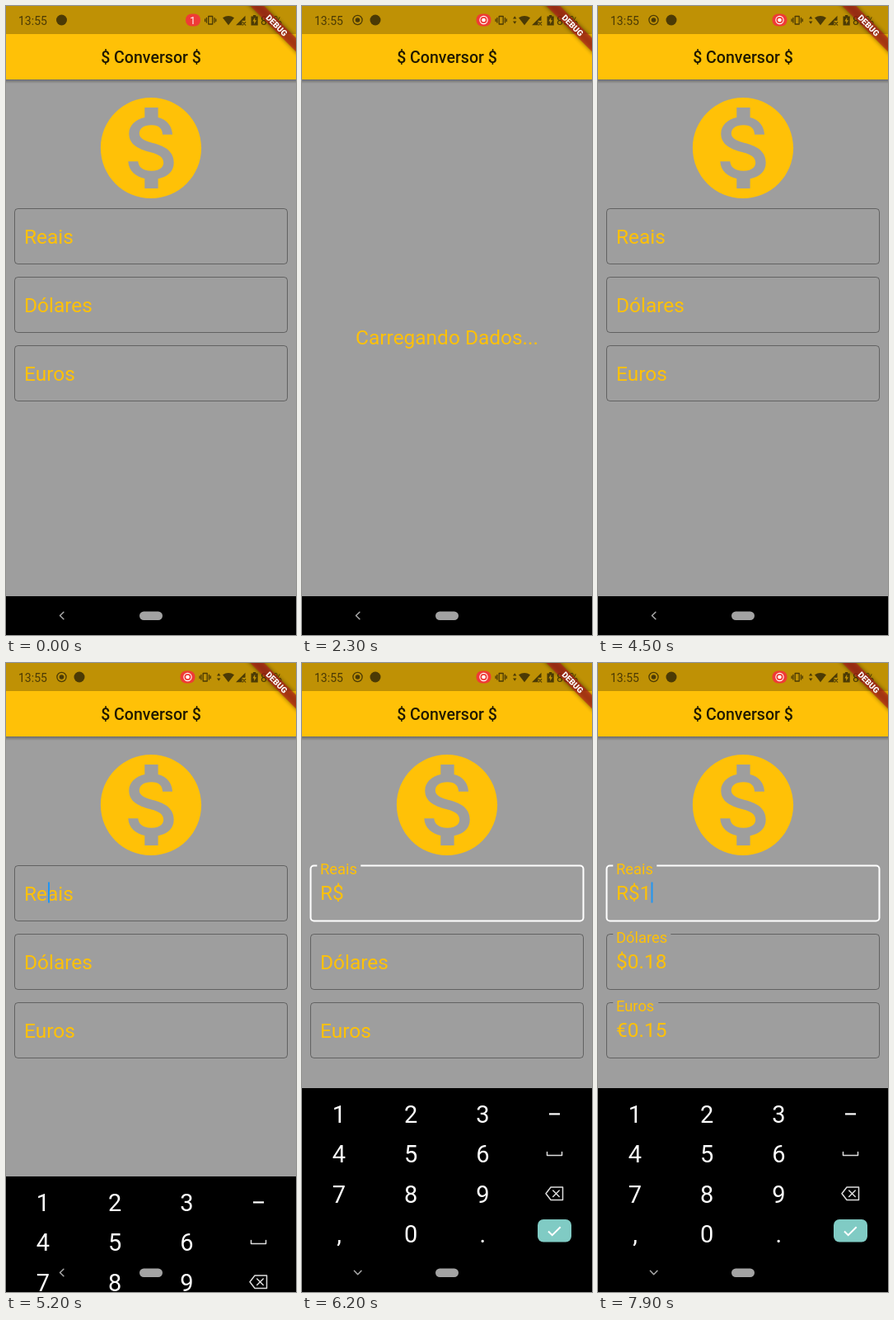
Write an HTML page that moves like this. It is 352x762 px and loops after 8 s.

```html
<!DOCTYPE html>
<html lang="pt">
<head>
<meta charset="utf-8">
<title>Conversor</title>
<style>
  html, body { margin: 0; width: 100%; height: 100%; overflow: hidden; background: #000; }
  svg { display: block; width: 352px; height: 762px; font-family: Roboto, sans-serif; }
  .amber { fill: #ffc107; font-size: 24.44px; }
  .keys { fill: #fff; font-size: 29px; text-anchor: middle; }
  .line { fill: none; stroke-linecap: round; stroke-linejoin: round; }
</style>
</head>
<body>
<svg viewBox="0 0 352 762">
  <defs>
    <linearGradient id="shade" x2="0" y2="1">
      <stop stop-color="#000" stop-opacity=".32"/>
      <stop offset="1" stop-color="#000" stop-opacity="0"/>
    </linearGradient>
    <filter id="blur" x="-20%" y="-60%" width="140%" height="220%"><feGaussianBlur stdDeviation="2.6"/></filter>
    <g id="record">
      <circle r="5.6" fill="none" stroke-width="1.3"/>
      <circle r="2.8" stroke="none"/>
    </g>
  </defs>

  <rect width="352" height="715" fill="#9e9e9e"/>
  <rect y="89" width="352" height="5" fill="url(#shade)"/>
  <rect width="352" height="89" fill="#ffc107"/>
  <rect width="352" height="34" fill="#bf9105"/>
  <text x="176" y="69" text-anchor="middle" font-size="19.56" font-weight="500" fill="#000" fill-opacity=".87">$ Conversor $</text>

  <!-- Status bar -->
  <g fill="#4b3a05" stroke="#4b3a05" stroke-width="0">
    <text x="15" y="22.5" font-size="14">13:55</text>
    <use id="recorder" href="#record" x="67.5" y="17"/>
    <circle id="app" cy="17" r="6.5"/>
    <g id="left">
      <rect x="218" y="9.5" width="18" height="15" rx="7.2" fill="#ef3b36"/>
      <text id="count" x="226.7" y="21.5" font-size="12" text-anchor="middle" style="fill:#fff">1</text>
      <g id="live" fill="#fff" stroke="#fff"><use href="#record" transform="translate(227 17) scale(.83)"/></g>
      <path class="line" stroke-width="1.3" d="M245.7 12.5h5v9.5h-5zM243.4 14.5v5.5M253 14.5v5.5M241.6 16v2.5M254.8 16v2.5"/>
    </g>
    <path id="arrows" d="M256 15.5l2.2-3.2 2.2 3.2zM256 18.5h4.4l-2.2 3.2z"/>
    <path d="M263 14.3q7-4.6 14 0l-7 9zM279 23.3l11.5-11.5v6h-4v5.5z"/>
    <path class="line" stroke-width="1.1" d="M287.2 19.6l3.6 3.6m0-3.6l-3.6 3.6"/>
    <path d="M297.5 12.5h2.4v-1.4h3.4v1.4h2.4v11h-8.2zM302.2 13.8l-2.8 4.6h1.8v3.6l2.8-4.8h-1.8z" fill-rule="evenodd"/>
    <text x="309" y="22.5" font-size="14">85%</text>
  </g>

  <g id="form">
    <path fill="#ffc107" transform="translate(102.67 98.67) scale(6.111)" d="M12 2C6.48 2 2 6.48 2 12s4.48 10 10 10 10-4.48 10-10S17.52 2 12 2zm1.41 16.09V20h-2.67v-1.93c-1.71-.36-3.16-1.46-3.27-3.4h1.96c.1 1.05.82 1.87 2.65 1.87 1.96 0 2.4-.98 2.4-1.59 0-.83-.44-1.61-2.67-2.14-2.48-.6-4.18-1.62-4.18-3.67 0-1.72 1.39-2.84 3.11-3.21V4h2.67v1.95c1.86.45 2.79 1.86 2.85 3.39H14.3c-.05-1.11-.64-1.87-2.22-1.87-1.5 0-2.4.68-2.4 1.64 0 .84.65 1.39 2.67 1.91s4.18 1.39 4.18 3.91c-.02 1.83-1.38 2.83-3.12 3.16z"/>
    <g id="fields"></g>
    <rect id="caret" y="265.5" width="2" height="25" fill="#2196f3"/>
  </g>
  <text id="loading" class="amber" x="176" y="410.3" text-anchor="middle">Carregando Dados...</text>

  <rect y="715" width="352" height="47" fill="#000"/>
  <g id="keyboard">
    <rect y="515" width="352" height="260" fill="#000"/>
    <g id="digits" class="keys"></g>
    <path d="M300 545.3h13v2.2h-13z" fill="#fff"/>
    <path class="line" stroke="#ddd" stroke-width="1.5" d="M297.5 592.5v4h18v-4"/>
    <path class="line" stroke="#ddd" stroke-width="1.5" d="M302 635h14.5v15.5h-14.5l-6-7.75zM304.7 639l7.5 7.5m0-7.5l-7.5 7.5"/>
    <rect x="286" y="674" width="41" height="27.5" rx="7" fill="#80cbc4"/>
    <path d="M299 688.5l4.7 4.7 10-10" fill="none" stroke="#fff" stroke-width="2"/>
  </g>

  <path id="back" class="line" stroke="#aaa" stroke-width="1.5" d="M2.2 -4.3l-4.4 4.3 4.4 4.3"/>
  <rect x="162" y="733.5" width="28" height="10.5" rx="5.25" fill="#a3a3a3"/>

  <g transform="translate(352 0) rotate(45) scale(.978)">
    <rect x="-48" y="28" width="96" height="12" fill="#000" opacity=".5" filter="url(#blur)"/>
    <rect x="-48" y="28" width="96" height="12" fill="#b71c1c" fill-opacity=".63"/>
    <text y="37.7" text-anchor="middle" font-size="10.2" font-weight="900" fill="#fff">DEBUG</text>
  </g>
</svg>

<script>
const LOOP = 8000, STEP = 100;
const RECORDING = 400, NETWORK = 2200, LOAD = 2300, READY = 3600, FOCUS = 5200, TYPED = 7500;
const FLOAT_TIME = 200;
const KEYBOARD = [[5000, 247], [5200, 107], [5300, 27], [5400, 2], [5500, 0]];
const CARET = [[FOCUS, 5900], [6300, 6800], [7200, LOOP]];

const $ = id => document.getElementById(id);
const show = (id, on) => { $(id).style.display = on ? '' : 'none'; };
const clamp = p => Math.max(0, Math.min(1, p));
const ease = p => p * p * (3 - 2 * p);

function tween(table, t) {
  if (t <= table[0][0]) return table[0][1];
  for (let i = 1; i < table.length; i++) {
    const [t0, a] = table[i - 1], [t1, b] = table[i];
    if (t <= t1) return a + (b - a) * (t - t0) / (t1 - t0);
  }
  return table.at(-1)[1];
}

const fields = [
  { name: 'Reais', gap: 53, start: FOCUS },
  { name: 'Dólares', gap: 70, start: TYPED, value: '$0.18' },
  { name: 'Euros', gap: 55, start: TYPED, value: '€0.15' },
];

$('fields').innerHTML = fields.map(({ name }, i) => `
  <g transform="translate(0 ${245.5 + 83 * i})">
    <rect class="box" x="10.5" width="331" height="67" rx="4" fill="none"/>
    <rect class="gap" x="18.3" y="-2" height="4" fill="#9e9e9e"/>
    <text class="amber label">${name}</text>
    <text class="amber value" x="22" y="41"></text>
  </g>`).join('');
fields.forEach((field, i) => {
  const group = $('fields').children[i];
  for (const part of ['box', 'gap', 'label', 'value']) field[part] = group.querySelector('.' + part);
});

$('digits').innerHTML = ['123', '456', '789', ',0.'].map((row, r) =>
  [...row].map((key, c) => `<text x="${45 + 87.2 * c}" y="${556.5 + 48.6 * r}">${key}</text>`).join('')
).join('');

function drawField(field, t, i) {
  const p = ease(clamp((t - field.start) / FLOAT_TIME));
  const focused = i === 0 && p > 0;
  field.box.setAttribute('stroke', focused ? '#fff' : '#000');
  field.box.setAttribute('stroke-opacity', focused ? p : .38);
  field.box.setAttribute('stroke-width', focused ? 1 + p : 1);
  field.gap.setAttribute('width', field.gap && p * fields[i].gapWidth);
  field.label.setAttribute('transform', `translate(22 ${42 - 31.7 * p}) scale(${1 - p / 4})`);
  field.value.textContent = i ? (t >= TYPED ? field.value.dataset.text : '')
    : p > 0 ? (t >= TYPED ? 'R$1' : 'R$') : '';
  field.value.setAttribute('opacity', i ? 1 : p);
}

['', '$0.18', '€0.15'].forEach((text, i) => { fields[i].value.dataset.text = text; });
[53, 70, 55].forEach((width, i) => { fields[i].gapWidth = width; });

function draw(t) {
  const recording = t >= RECORDING, network = t >= NETWORK;
  show('recorder', recording);
  show('live', recording);
  show('count', !recording);
  show('arrows', network);
  $('app').setAttribute('cx', recording ? 89 : 67.5);
  $('left').setAttribute('transform', `translate(${network ? -6.5 : 0} 0)`);

  const loading = t >= LOAD && t < READY;
  show('loading', loading);
  show('form', !loading);
  fields.forEach((field, i) => drawField(field, t, i));

  show('caret', CARET.some(([on, off]) => t >= on && t < off));
  $('caret').setAttribute('x', t >= TYPED ? 64.5 : 51);

  const drop = tween(KEYBOARD, t);
  show('keyboard', drop < 247);
  $('keyboard').setAttribute('transform', `translate(0 ${drop})`);
  $('back').setAttribute('transform', `translate(67.7 738.5) rotate(${t > FOCUS ? -90 : 0})`);
}

function frame() {
  draw(Math.floor(performance.now() % LOOP / STEP) * STEP);
  requestAnimationFrame(frame);
}
frame();
</script>
</body>
</html>
```
